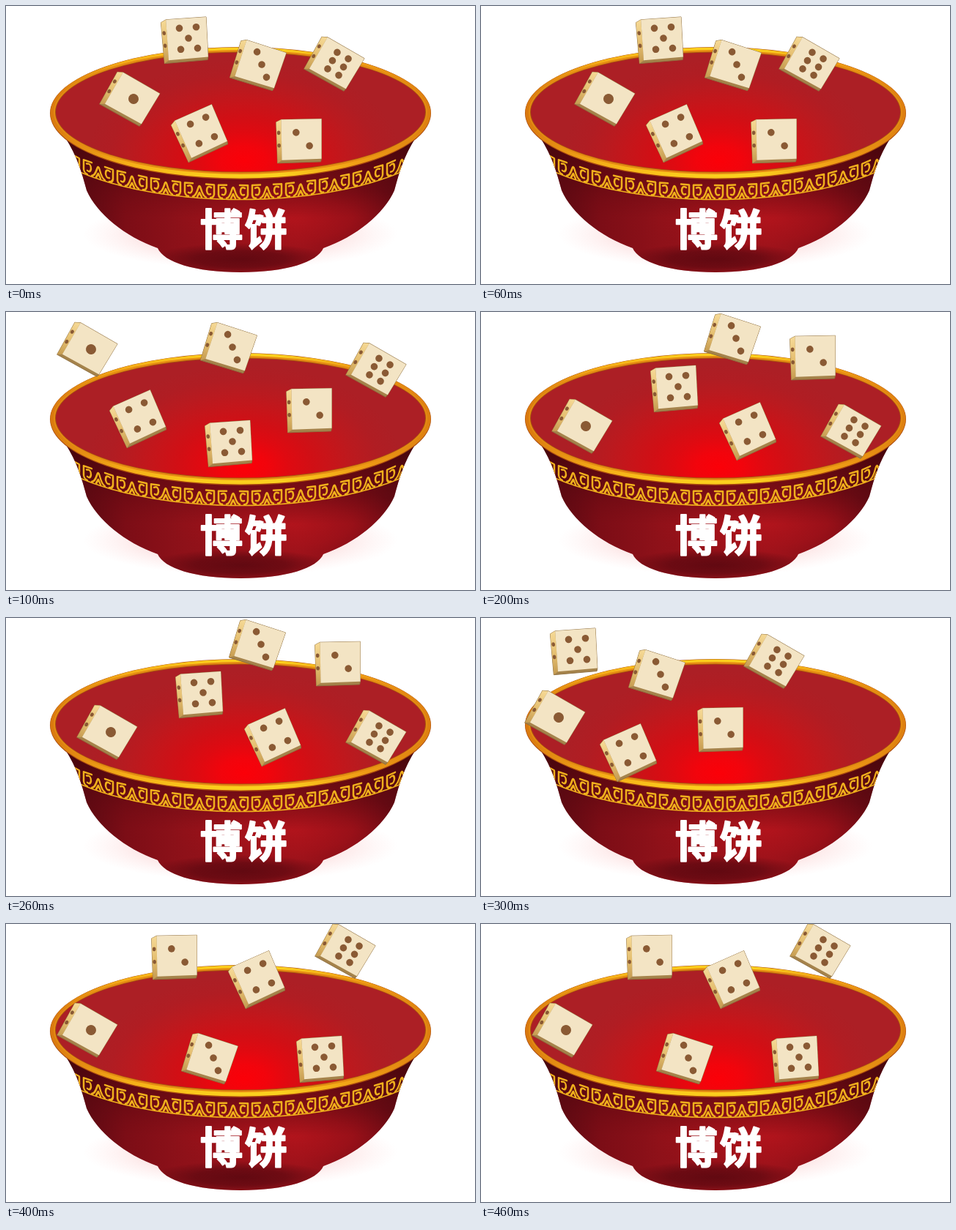
These frames come from a looping animation (640 by 380 pixels, 0.5 s). An HTML page with a canvas:

```html
<!DOCTYPE html>
<html lang="zh">
<head>
<meta charset="utf-8">
<title>博饼</title>
<style>
  html, body { margin: 0; width: 100%; height: 100%; overflow: hidden; background: #fff; }
  canvas { display: block; }
</style>
</head>
<body>
<canvas id="stage" width="640" height="380"></canvas>
<script>
const W = 640, H = 380, STEP = 100, STEPS = 5;
const CX = 320, RIM_Y = 145;
const stage = document.getElementById('stage').getContext('2d');

// Spreads the colours evenly over a gradient.
function blend(gradient, colors) {
  colors.forEach((color, i) => gradient.addColorStop(i / (colors.length - 1), color));
  return gradient;
}
function linear(g, x0, y0, x1, y1, ...colors) {
  return blend(g.createLinearGradient(x0, y0, x1, y1), colors);
}
function ellipse(g, x, y, rx, ry, fill) {
  g.beginPath();
  g.ellipse(x, y, rx, ry, 0, 0, Math.PI * 2);
  g.fillStyle = fill;
  g.fill();
}
// Radial gradient squashed to an ellipse, painted over the current clip.
function glow(g, x, y, rx, ry, ...colors) {
  g.save();
  g.translate(x, y);
  g.scale(1, ry / rx);
  g.fillStyle = blend(g.createRadialGradient(0, 0, 0, 0, 0, rx), colors);
  g.fillRect(-W, -W * 2, W * 2, W * 4);
  g.restore();
}
function polygon(g, points, fill) {
  g.beginPath();
  points.forEach(([x, y]) => g.lineTo(x, y));
  g.closePath();
  g.fillStyle = fill;
  g.fill();
}
const mirrored = (g, draw) => [1, -1].forEach(side => {
  g.save();
  g.scale(side, 1);
  draw(side);
  g.restore();
});

// ---- Bowl ----
const bodyHalf = side => {
  const x = d => CX + side * d;
  return `M${CX} 180 L${x(239)} 180 C${x(223)} 205 ${x(217)} 226 ${x(210)} 252
    C${x(196)} 284 ${x(158)} 315 ${x(113)} 331 C${x(105)} 350 ${x(62)} 364 ${CX} 364 Z`;
};

function drawBody(g) {
  glow(g, CX, 312, 215, 48, '#f9d0d0', '#fbdcdc', '#fdeaea', 'rgba(255,240,240,0)');
  g.save();
  g.clip(new Path2D(bodyHalf(-1) + bodyHalf(1)));
  g.fillStyle = linear(g, 85, 0, 555, 0,
    '#4f0811', '#7c0d16', '#8e1119', '#96121a', '#9d131b', '#800d16', '#4f0811');
  g.fillRect(0, 0, W, H);
  glow(g, 390, 290, 165, 58, 'rgba(182,20,28,.8)', 'rgba(168,18,26,.6)', 'rgba(150,16,24,0)');
  g.fillStyle = linear(g, 0, 190, 0, 290, 'rgba(70,5,12,.75)', 'rgba(90,8,16,.55)', 'rgba(110,10,18,0)');
  g.fillRect(0, 0, W, H);
  glow(g, CX, 346, 125, 22, 'rgba(92,8,16,.9)', 'rgba(92,8,16,.7)', 'rgba(92,8,16,0)');
  drawBand(g);
  g.restore();
}

// ---- Gold ornament following the curve of the bowl ----
const bandY = x => RIM_Y + 109 * Math.sqrt(1 - ((x - CX) / 290) ** 2);

function drawBand(g) {
  const arch = new Path2D('M-9 9 Q-5 8 -2 -2 Q0 -10 2 -2 Q5 8 9 9 M-3 9 L0 3 L3 9');
  const scroll = new Path2D('M9 -9 L20 -9 L20 4 Q19 9 15 9 M16 -5 Q10 -8 10 0 Q11 6 15 4');
  g.strokeStyle = '#f0b01c';
  g.lineCap = g.lineJoin = 'round';
  g.lineWidth = 1.6;
  g.beginPath();
  for (let x = 80; x <= 560; x += 4) g.lineTo(x, bandY(x) + 10.5);
  g.stroke();
  g.lineWidth = 2.5;
  for (let x = 80; x <= 560; x += 46) {
    g.save();
    g.transform(1, (bandY(x + 1) - bandY(x - 1)) / 2, 0, 1, x, bandY(x));
    g.stroke(arch);
    mirrored(g, () => g.stroke(scroll));
    g.restore();
  }
}

function drawRim(g) {
  ellipse(g, CX, 146.5, 260, 90.5, '#a8480f');
  ellipse(g, CX, 146, 259.5, 89.5,
    linear(g, 60, 0, 580, 0, '#d9780f', '#f5ae18', '#fbcb1c', '#fbd11f', '#f0a016', '#dd7f10'));
  ellipse(g, CX, RIM_Y, 255, 85, '#e58b12');
  ellipse(g, CX, RIM_Y, 253, 82.5, '#a8540f');
  g.save();
  g.beginPath();
  g.ellipse(CX, RIM_Y, 252, 81.5, 0, 0, Math.PI * 2);
  g.clip();
  glow(g, 325, 212, 215, 140,
    '#fb0008', '#f2040c', '#df0a11', '#d10f15', '#c6151a', '#ba1a1f', '#b01d23', '#ac1f25');
  g.restore();
}

function drawTitle(g) {
  g.font = '900 58px "Noto Sans CJK SC", "Noto Sans CJK", sans-serif';
  g.textAlign = 'center';
  g.lineJoin = 'round';
  g.lineWidth = 2;
  g.fillStyle = g.strokeStyle = '#fff';
  [...'博饼'].forEach((char, i) => {
    g.fillText(char, 294 + i * 61, 327);
    g.strokeText(char, 294 + i * 61, 327);
  });
}

// ---- Dice: each one jumps through its landing points ----
const DICE = [
  { value: 1, angle: 30, stops: [[174, 127], [116, 51], [143, 156], [106, 136], [116, 145]] },
  { value: 2, angle: -1, stops: [[405, 182], [419, 132], [458, 60], [332, 150], [235, 43]] },
  { value: 3, angle: 18, stops: [[349, 80], [309, 48], [348, 36], [245, 77], [283, 183]] },
  { value: 4, angle: -24, stops: [[268, 170], [184, 142], [368, 159], [205, 180], [346, 72]] },
  { value: 5, angle: -4, stops: [[249, 44], [309, 177], [269, 102], [132, 43], [434, 182]] },
  { value: 6, angle: 30, stops: [[453, 79], [510, 79], [510, 163], [405, 59], [468, 37]] }
];

// Odd values have a centre pip; the others come in opposite pairs.
function pips(value) {
  const dx = value === 6 ? 8.7 : value === 2 ? 9 : 11.5;
  const dy = value === 6 ? 13 : value === 2 ? 9.3 : 14.5;
  const pair = (x, y) => [[x, y], [-x, -y]];
  return [
    ...(value % 2 ? [[0, 0]] : []),
    ...(value > 1 ? pair(dx, dy) : []),
    ...(value > 3 ? pair(dx, -dy) : []),
    ...(value > 5 ? pair(dx, 0) : [])
  ];
}
const shift = ([x, y], dx, dy) => [x + dx, y + dy];
const mix = (a, b, t) => [a[0] + (b[0] - a[0]) * t, a[1] + (b[1] - a[1]) * t];

function drawDie(g, { value, angle, stops }, step) {
  // Dice leaning to the right look wider and flatter.
  const lean = Math.max(0, angle) / 10;
  const hw = 27.5 + lean / 2, hh = 27.3 - lean;
  const left = -hw - 1.5, right = hw - 1.5;
  const tl = [left, -hh], tr = [right, -hh], br = [right - 1, hh], bl = [left, hh + 1];
  const outerTl = shift(tl, -7, 3.5), outerBl = shift(bl, -6, 4), outerBr = shift(br, -1, 4);

  g.save();
  g.translate(...stops[step]);
  g.rotate(angle * Math.PI / 180);
  polygon(g, [tl, tr, br, outerBr, outerBl, outerTl], '#a5834b');
  g.strokeStyle = '#8f6f3f';
  g.lineWidth = 0.9;
  g.stroke();
  polygon(g, [tl, bl, outerBl, outerTl], linear(g, ...outerTl, ...outerBl, '#f4d793', '#e5bf70', '#c49a50'));
  polygon(g, [tl, tr, br, bl], '#f3e4c4');

  const dot = ([x, y], rx, ry) => ellipse(g, x, y, rx, ry, '#8a5a34');
  for (const t of [0.29, 0.6]) dot(mix(mix(tl, outerTl, 0.55), mix(bl, outerBl, 0.55), t), 2.3, 2.8);
  const radius = value === 1 ? 7 : 4.8;
  pips(value).forEach(pip => dot(pip, radius, radius));
  g.restore();
}

// ---- Playback ----
const bowl = document.createElement('canvas');
bowl.width = W;
bowl.height = H;
const bowlContext = bowl.getContext('2d');
bowlContext.fillStyle = '#fff';
bowlContext.fillRect(0, 0, W, H);
drawBody(bowlContext);
drawRim(bowlContext);
drawTitle(bowlContext);

let start;
function render(now) {
  start ??= now;
  const step = Math.floor((now - start) / STEP) % STEPS;
  stage.drawImage(bowl, 0, 0);
  DICE.forEach(die => drawDie(stage, die, step));
  requestAnimationFrame(render);
}
requestAnimationFrame(render);
</script>
</body>
</html>
```
